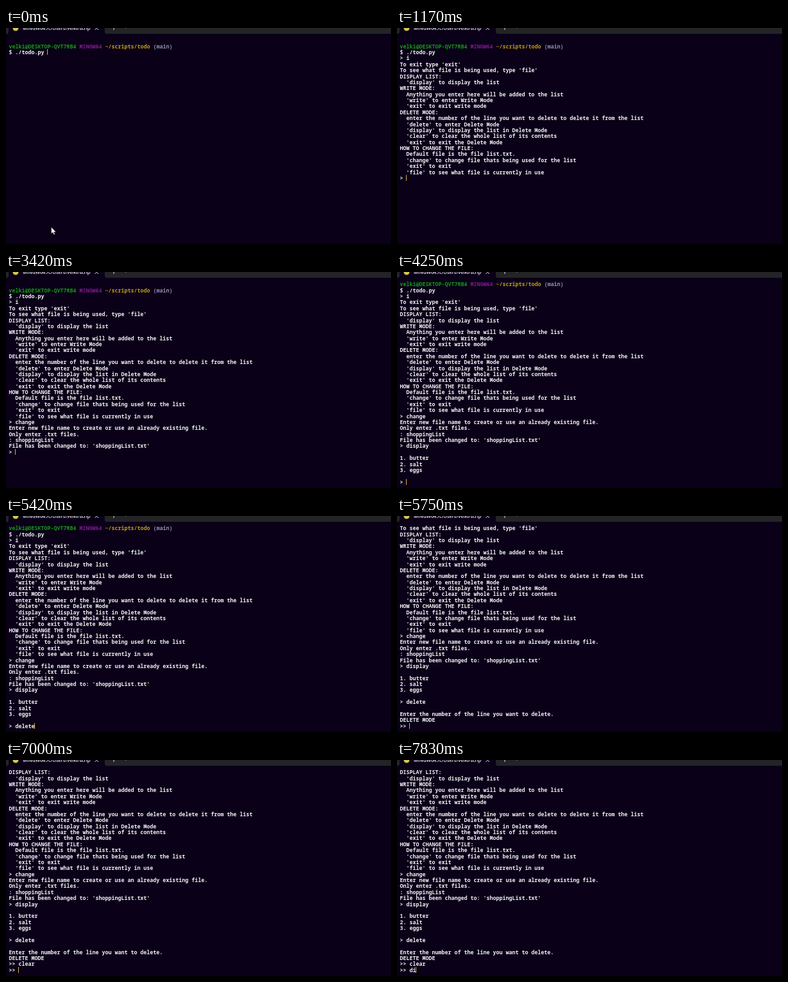
Animation of 600x338 px, one loop 8000 ms. Source, as an HTML page:

```html
<!DOCTYPE html>
<html lang="en">
<head>
<meta charset="utf-8">
<title>Todo terminal</title>
<style>
html, body { margin: 0; width: 100%; height: 100%; overflow: hidden; background: #0a0018; }
#stage { position: relative; width: 600px; height: 338px; overflow: hidden; background: #0a0018; }
#bar { position: absolute; left: 0; top: 0; }
#bar text { font: 600 7.3px "Open Sans", sans-serif; fill: #f2f2f2; }
#screen {
  position: absolute; left: 4.5px; top: 14.3px; margin: 0; white-space: pre;
  font: 600 8.333px/9.38px "Noto Sans Mono", "DejaVu Sans Mono", monospace;
  color: #f0f0f0; font-variant-ligatures: none;
}
.user { color: #139a12; }
.sys { color: #80188f; }
.path { color: #c09c14; }
.branch { color: #968cb2; }
#caret { position: absolute; width: 1px; height: 9px; background: #cdb647; }
#mouse { position: absolute; left: 70px; top: 311px; }
</style>
</head>
<body>
<div id="stage">
  <svg id="bar" width="600" height="10">
    <path d="M0 0H4V6Q4 9 1 9H0ZM154 0H600V9H157Q154 9 154 6Z" fill="#242427"/>
    <circle cx="15" cy="0" r="4.5" fill="#d6c84a"/>
    <text x="26" y="2.8">MINGW64:/c/Users/velki/scrip</text>
    <path d="M138.5 3L141.2 .3L144 3M168 0V3" fill="none" stroke="#e4e4e4"/>
    <path d="M185 -1L186.500 .6L188 -1" fill="none" stroke="#aaa"/>
  </svg>
  <pre id="screen"></pre>
  <div id="caret"></div>
  <svg id="mouse" width="9" height="14">
    <path d="M.5 .5V11L3 8.800L4.700 12.500L6.400 11.700L4.800 8.200H8Z" fill="#fff" stroke="#111" stroke-width=".6"/>
  </svg>
</div>
<script>
const LOOP = 8000, ROWS = 34, CELL = 5, LINE = 9.38, LEFT = 4.5, TOP = 14.3;

const prompt = [
  ["user", "velki@DESKTOP-QVT7RB4"], ["sys", "MINGW64"],
  ["path", "~/scripts/todo"], ["branch", "(main)"]
].map(([name, text]) => `<span class="${name}">${text}</span>`).join(" ");

const help = `
To exit type 'exit'
To see what file is being used, type 'file'
DISPLAY LIST:
  'display' to display the list
WRITE MODE:
  Anything you enter here will be added to the list
  'write' to enter Write Mode
  'exit' to exit write mode
DELETE MODE:
  enter the number of the line you want to delete to delete it from the list
  'delete' to enter Delete Mode
  'display' to display the list in Delete Mode
  'clear' to clear the whole list of its contents
  'exit' to exit the Delete Mode
HOW TO CHANGE THE FILE:
  Default file is the file list.txt.
  'change' to change file thats being used for the list
  'exit' to exit
  'file' to see what file is currently in use
> `;

// [time in ms, text added to the terminal]
const steps = [
  [0, "\n" + prompt + "\n$ ./todo.py "],
  [80, "\n"], [250, "> "], [750, "i"],
  [1080, help],
  [1250, "c"], [1330, "h"], [1420, "a"], [1500, "n"], [1580, "g"], [1670, "e"],
  [1750, "\nEnter new file name to create or use an already existing file.\nOnly enter .txt files.\n: "],
  [1920, "s"], [2080, "h"], [2250, "o"], [2330, "p"], [2500, "p"], [2580, "i"], [2670, "ng"],
  [2920, "L"], [3000, "i"], [3080, "s"], [3170, "t"],
  [3330, "\nFile has been changed to: 'shoppingList.txt'\n> "],
  [3580, "d"], [3670, "i"], [3750, "s"], [3830, "p"], [3920, "la"], [4000, "y"],
  [4170, "\n\n1. butter\n2. salt\n3. eggs\n\n> "],
  [4500, "d"], [4580, "e"], [4670, "l"], [4750, "e"], [4920, "t"], [5000, "e"],
  [5670, "\n\nEnter the number of the line you want to delete.\nDELETE MODE\n>> "],
  [6500, "c"], [6580, "l"], [6670, "ea"], [6750, "r"],
  [6920, "\n>> "],
  [7750, "d"], [7830, "i"]
];

const [screen, caret, mouse] = ["screen", "caret", "mouse"].map(id => document.getElementById(id));
let shown = 0;

function draw(time) {
  const count = steps.filter(([at]) => at <= time).length;
  if (count === shown) return;
  shown = count;
  const text = steps.slice(0, count).map(step => step[1]).join("");
  const rows = text.split("\n").slice(-ROWS);
  const last = rows.length - 1;
  screen.innerHTML = "<i></i>" + rows.map(row => row.replace(/^>+/, m => "&gt;".repeat(m.length))).join("\n");
  caret.style.left = LEFT + rows[last].length * CELL - .5 + "px";
  caret.style.top = Math.round(TOP + last * LINE) + "px";
  mouse.style.visibility = count > 1 ? "hidden" : "visible";
}

const start = performance.now();
function tick() {
  draw((performance.now() - start) % LOOP);
  requestAnimationFrame(tick);
}
tick();
</script>
</body>
</html>
```
